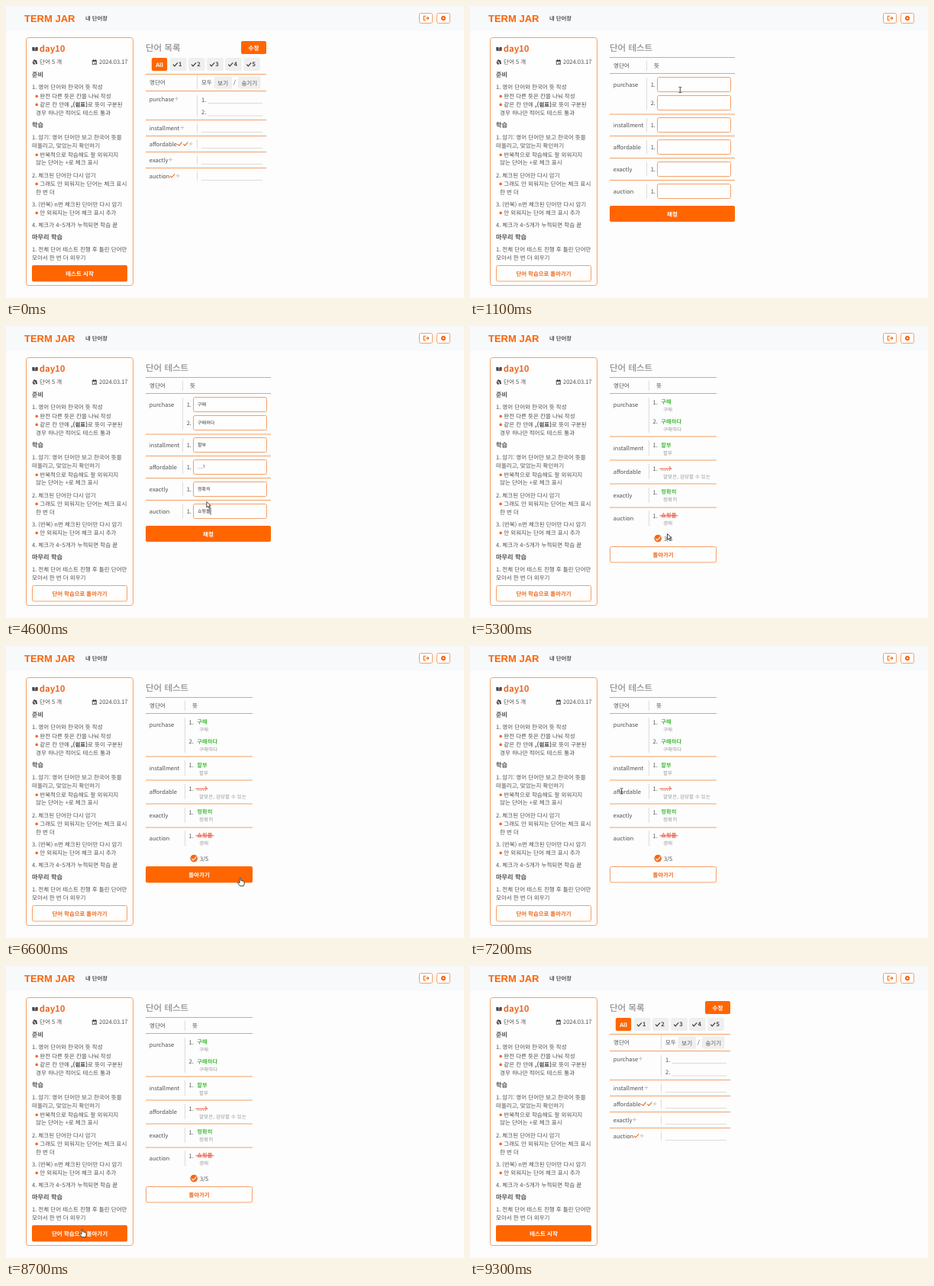
Recreate the animation shown at these times as an HTML page. Size 600 by 383 pixels, loop 9800 ms.

```html
<!DOCTYPE html>
<html lang="ko">
<head>
<meta charset="utf-8">
<title>단어 테스트</title>
<style>
  html, body { margin: 0; width: 100%; height: 100%; overflow: hidden; background: #fdfdfe; }
  svg { display: block; width: 600px; height: 383px; }
  text { font-family: "Noto Sans CJK KR", "Noto Sans KR", "Noto Sans CJK", sans-serif; font-size: 7.5px; fill: #505050; white-space: pre; text-rendering: geometricPrecision; }
  .bold { font-weight: 700; fill: #444; }
  .nav { font-size: 7.3px; font-weight: 700; fill: #555; }
  .title { font-size: 11.5px; font-weight: 300; fill: #777; }
  .head { font-size: 8.2px; font-weight: 700; fill: #555; }
  .day { font-size: 11.3px; font-weight: 700; fill: #ee6a1c; }
  .brand { font: 700 13px "Liberation Sans", Arial, sans-serif; fill: #f7640a; }
  .typed { font-size: 6.1px; fill: #333; }
  .sub { font-size: 6.6px; fill: #999; }
  .good { font-size: 7.3px; font-weight: 700; fill: #3fbf3a; }
  .bad { font-size: 7.3px; font-weight: 700; fill: #f2654f; }
  .strike { stroke: #f2553f; }
  .white { font-weight: 700; fill: #fff; }
  .plain { fill: #fff; }
  .orange { font-size: 7.4px; font-weight: 700; fill: #ee6a1c; }
  .mid { text-anchor: middle; }
  .rule { stroke: #f3a065; }
  .gray { stroke: #d4d4d4; stroke-width: .8; }
  .bar { fill: #f8f9fa; }
  .fill { fill: #ff6600; }
  .mark { fill: #ee6a1c; }
  .soft { fill: #efefef; }
  .box { fill: #fefefe; stroke: #f5a168; }
  .select { fill: #3767c8; }
  .icon { fill: #484848; fill-rule: evenodd; }
  .tick { fill: none; stroke: #ee6a1c; stroke-width: 1.1; }
  .dark { stroke: #333; }
  .light { stroke: #fff; }
  .plus { stroke: #bbb; stroke-width: .8; }
  .pointer { fill: #fff; stroke: #333; stroke-width: .9; stroke-linejoin: round; }
  .beam { fill: none; stroke: #333; stroke-width: .9; }
  #caret { stroke: #333; stroke-width: .8; }
</style>
</head>
<body>
<svg viewBox="0 0 600 383" id="stage"></svg>
<script>
const LOOP = 9800;

// Markup helpers: text is placed by its vertical centre.
const text = (x, y, s, cls = '') => {
  const drop = /title|day/.test(cls) ? 4.3 : /typed|sub/.test(cls) ? 2.3 : 2.8;
  return `<text x="${x}" y="${y + drop}" class="${cls}">${s}</text>`;
};
const rect = (x, y, w, h, cls, r = 2) =>
  `<rect x="${x}" y="${y}" width="${w}" height="${h}" rx="${r}" class="${cls}"/>`;
const dot = (x, y, r, cls) => `<circle cx="${x}" cy="${y}" r="${r}" class="${cls}"/>`;
const path = (d, cls) => `<path d="${d}" class="${cls}"/>`;
const line = (x1, y1, x2, y2, cls) => path(`M${x1} ${y1}L${x2} ${y2}`, cls);
const rules = (x2, ys) => ys.map(y => line(183, y, x2, y, 'rule')).join('');
const dividers = (x, spans) => spans.map(([a, b]) => line(x, a, x, b, 'gray')).join('');
const button = (x, y, w, h, label, cls, textCls = '') =>
  rect(x, y, w, h, cls) + text(x + w / 2, y + h / 2 + .2, label, 'mid ' + textCls);
const tick = (x, y, cls = '') => path(`M${x} ${y}l2 2.2l4 -4.6`, 'tick ' + cls);
const plus = (x, y) => path(`M${x} ${y}h5m-2.5 -2.5v5`, 'plus');
const group = (id, body) => `<g id="${id}">${body}</g>`;

const words = ['purchase', 'installment', 'affordable', 'exactly', 'auction'];
const wordColumn = ys => words.map((w, i) => text(187.8, ys[i], w)).join('');

function header() {
  const gear = [0, 45, 90, 135].map(a =>
    `<g transform="rotate(${a} 573 16)">${rect(572, 12.9, 2, 6.2, 'mark', 0)}</g>`).join('');
  return rect(0, 0, 600, 32, 'bar', 0) +
    '<text x="24" y="21" class="brand">TERM JAR</text>' +
    text(104, 16.2, '내 단어장', 'nav') +
    rect(541.5, 9.5, 17, 13, 'box') + rect(564.5, 9.5, 17, 13, 'box') +
    path('M550 13.3h-2.6v5.4h2.6M549.5 16h4M552 14.2l1.8 1.8l-1.8 1.8', 'tick') +
    gear + dot(573, 16, 2.3, 'mark') + dot(573, 16, 1, 'plain');
}

function sidebar() {
  const heads = [[90, '준비'], [156, '학습'], [303, '마무리 학습']];
  const indent = 44.3;
  const notes = [
    [34, 106, '1. 영어 단어와 한국어 뜻 작성'],
    [indent, 118, '완전 다른 뜻은 칸을 나눠 작성'],
    [indent, 129, '같은 칸 안에 <tspan class="bold">,(쉼표)</tspan>로 뜻이 구분된'],
    [39, 139.7, '경우 하나만 적어도 테스트 통과'],
    [34, 172, '1. 암기: 영어 단어만 보고 한국어 뜻을'],
    [34, 183, '떠올리고, 맞았는지 확인하기'],
    [indent, 194.8, '반복적으로 학습해도 잘 외워지지'],
    [39, 205.5, '않는 단어는 +로 체크 표시'],
    [34, 222, '2. 체크된 단어만 다시 암기'],
    [indent, 233, '그래도 안 외워지는 단어는 체크 표시'],
    [39, 243.7, '한 번 더'],
    [34, 260, '3. (반복) n번 체크된 단어만 다시 암기'],
    [indent, 271, '안 외워지는 단어 체크 표시 추가'],
    [34, 287, '4. 체크가 4~5개가 누적되면 학습 끝'],
    [34, 319.3, '1. 전체 단어 테스트 진행 후 틀린 단어만'],
    [34, 330, '모아서 한 번 더 외우기'],
  ];
  return rect(26.5, 41.5, 140, 325, 'box', 3) +
    path('M34.3 54q2 -.6 3.4 .5v4.8q-1.5 -1 -3.4 -.5zM41.7 54q-2 -.6 -3.4 .5v4.8q1.5 -1 3.4 -.5z', 'icon') +
    text(43.7, 56, 'day10', 'day') +
    path('M36.5 70.3l3.6 .9l1 4.6l-2 .7l-1 -3.6l-3 -.4zM34.2 73.2l3 .2l1 3.4l-2.4 -.3z', 'icon') +
    text(44, 73.6, '단어 5 개') +
    path('M112.8 71h6v6h-6zM113.6 73v3.2h4.4v-3.2zM114 70h1v1h-1zM116.8 70h1v1h-1zM115.8 74.2h1.6v1.6h-1.6z', 'icon') +
    text(122, 73.6, '2024.03.17') +
    heads.map(([y, s]) => text(34, y, s, 'head')).join('') +
    notes.map(([x, y, s]) => (x === indent ? dot(40.2, y + .4, 1.8, 'mark') : '') + text(x, y, s)).join('') +
    group('start', button(34, 340, 125, 21.5, '테스트 시작', 'fill', 'white')) +
    group('back', button(34.5, 340.5, 124, 20.5, '단어 학습으로 돌아가기', 'box', 'orange')) +
    group('backHover', button(34, 340, 125, 21.5, '단어 학습으로 돌아가기', 'fill', 'white'));
}

function listScreen() {
  const rows = [122.3, 160, 181, 202, 223];
  const tabs = [1, 2, 3, 4, 5].map(n => {
    const x = 190.8 + n * 24.1;
    return rect(x, 68, 21.6, 17, 'soft') + tick(x + 4, 76.7, 'dark') +
      text(x + 11.2, 76.5, n, 'bold');
  }).join('');
  return text(183, 55, '단어 목록', 'title') +
    button(308, 46, 33, 17, '수정', 'fill', 'white') +
    button(190.8, 68, 20.4, 17, 'All', 'fill', 'white') + tabs +
    rules(341, [89.5, 111.5, 149.5, 170.5, 191.5, 212.5]) +
    text(188, 100.5, '영단어') + text(256, 100.5, '모두') +
    button(272.5, 92.5, 23.5, 16, '보기', 'soft') + text(298, 100.5, '/') +
    button(304, 92.5, 29.5, 16, '숨기기', 'soft') +
    dividers(250.5, [[90, 110], [117, 145], ...rows.slice(1).map(y => [y - 6, y + 6])]) +
    wordColumn(rows) +
    plus(220.9, 121.5) + plus(228.5, 159.5) + plus(239.5, 180.8) + plus(213, 201.5) + plus(222.5, 222.7) +
    tick(224.6, 181) + tick(232.3, 181) + tick(215, 222.8) +
    text(256, 123, '1.') + text(256, 139.3, '2.') +
    line(264.5, 127.5, 336, 127.5, 'gray') + line(264.5, 144, 336, 144, 'gray') +
    rows.slice(1).map(y => line(256, y + 5.5, 336, y + 5.5, 'gray')).join('');
}

const inputYs = [103, 127, 156, 185, 214, 243];

function testScreen() {
  const rows = [103, 156, 185, 214, 243];
  return text(183, 55, '단어 테스트', 'title') +
    rules(347, [67.5, 88.5, 142, 170.5, 199.5, 228.5]) +
    text(188, 78, '영단어') + text(241, 78, '뜻') +
    dividers(231.5, [[72, 85], [94, 136], ...rows.slice(1).map(y => [y - 9, y + 9])]) +
    wordColumn(rows) +
    inputYs.map((y, i) => text(236.7, y + .3, i === 1 ? '2.' : '1.') +
      rect(245.5, y - 9.5, 96, 19, 'box') +
      group('in' + i, text(251, y, '', 'typed'))).join('') +
    '<path id="caret"/>' +
    button(183, 262, 164, 21, '채점', 'fill', 'white');
}

function resultScreen() {
  const rows = [103, 160, 191, 222, 252.5];
  const answers = [
    [99.5, '구매', '구매'], [125, '구매하다', '구매하다'], [156, '할부', '할부'],
    [187, '....?', '알맞은, 감당할 수 있는', 16], [217.5, '정확히', '정확히'], [248.5, '쇼핑몰', '경매', 24],
  ];
  const selected = (id, row, w) => group(id, rect(187.5, rows[row] - 5.5, w, 11, 'select', 0) +
    text(187.8, rows[row], words[row], 'plain'));
  return text(183, 55, '단어 테스트', 'title') +
    rules(323, [67.5, 88.5, 145, 176, 207, 238]) +
    text(188, 78, '영단어') + text(244, 78, '뜻') +
    dividers(234.5, [[72, 85], [94, 140], ...rows.slice(1).map(y => [y - 10, y + 10])]) +
    wordColumn(rows) +
    selected('pickA', 2, 36.5) + selected('pickB', 4, 26.7) +
    answers.map(([y, given, right, strike], i) =>
      text(239.5, y + .3, i === 1 ? '2.' : '1.') + text(250.3, y, given, strike ? 'bad' : 'good') +
      (strike ? path(`M248.5 ${y + .3}h${strike}`, 'strike') : '') +
      text(253, y + 10.5, right, 'sub')).join('') +
    dot(246.2, 278.6, 4.8, 'mark') + tick(243.4, 278.8, 'light') +
    text(254, 278.8, '3/5') +
    group('again', button(183.5, 289.5, 139, 20.5, '돌아가기', 'box', 'orange')) +
    group('againHover', button(183, 289, 140, 21.5, '돌아가기', 'fill', 'white'));
}

const pointers =
  group('arrow', path('M0 0v7.6l1.8 -1.6l1.3 2.8l1.2 -.6l-1.3 -2.6h2.5z', 'pointer')) +
  group('hand', path('M-1 -4.2q1 -1.2 1.8 0v3q1.2 -.5 1.6 .4q1.1 -.4 1.5 .5q1.3 -.2 1.3 1.2v2.2l-1 2.7h-4.6l-3 -4q-.3 -1.4 1.1 -1l1.3 1.2z', 'pointer')) +
  group('beam', path('M-1.8 -3.6h1.3l.5 .5l.5 -.5h1.3M0 -3v6M-1.8 3.6h1.3l.5 -.5l.5 .5h1.3', 'beam'));

const stage = document.getElementById('stage');
stage.innerHTML = header() + sidebar() + group('list', listScreen()) +
  group('test', testScreen()) + group('result', resultScreen()) + group('pointer', pointers);

const $ = id => document.getElementById(id);
const show = (id, on) => $(id).setAttribute('display', on ? 'inline' : 'none');

// Pointer stops: time, x, y, shape from then on.
const stops = [
  [100, 150, 290, 'arrow'], [400, 104, 351, 'hand'], [600, 104, 351, 'arrow'],
  [900, 275.3, 110, 'beam'], [4400, 275.3, 110, 'arrow'], [4700, 258.5, 272.5, 'hand'],
  [4800, 258.5, 272.5, 'arrow'], [6100, 258.5, 272.5, 'arrow'], [6500, 307, 309, 'hand'],
  [6800, 307, 309, 'arrow'], [7100, 189, 190, 'beam'], [7400, 226, 191, 'arrow'],
  [7600, 189, 252, 'beam'], [7900, 225.3, 249, 'arrow'], [8200, 225.3, 249, 'arrow'],
  [8600, 100, 350, 'hand'], [8900, 100, 350, 'arrow'], [9200, 102, 374, 'arrow'], [9300, 102, 383, 'arrow'],
];

// Each input: focus time, first key time, and the text after each 100 ms.
const typing = [
  [1000, 1500, '구|구매'],
  [1700, 1700, '구|구매|구매하|구매하다'],
  [2100, 2100, '하|할|할부'],
  [2400, 2600, '.|..|...|....|....?'],
  [3200, 3400, '저|정|정화|정확|정확히'],
  [3900, 4000, '쇼|쇼피|쇼핑|쇼핑모|쇼핑몰'],
].map(([focus, from, keys]) => ({ focus, from, keys: keys.split('|') }));

function drawPointer(t) {
  const i = stops.findLastIndex(s => s[0] <= t);
  const visible = i >= 0 && i < stops.length - 1;
  show('pointer', visible);
  if (!visible) return;
  const [t0, x0, y0, shape] = stops[i], [t1, x1, y1] = stops[i + 1];
  const p = (t - t0) / (t1 - t0), e = p * p * (3 - 2 * p);
  $('pointer').setAttribute('transform', `translate(${x0 + (x1 - x0) * e} ${y0 + (y1 - y0) * e})`);
  for (const s of ['arrow', 'hand', 'beam']) show(s, s === shape);
}

function drawTyping(t) {
  const fields = typing.map((_, i) => $('in' + i).firstChild);
  typing.forEach(({ from, keys }, i) => {
    const n = Math.min(Math.floor((t - from) / 100), keys.length - 1);
    fields[i].textContent = n < 0 ? '' : keys[n];
  });
  const active = typing.findLastIndex(f => f.focus <= t);
  show('caret', active >= 0 && !(t >= 1100 && t < 1300));
  if (active < 0) return;
  const x = 251.2 + fields[active].getComputedTextLength();
  $('caret').setAttribute('d', `M${x} ${inputYs[active] - 4.8}v9.6`);
}

function draw(time) {
  const t = Math.floor(time % LOOP / 100) * 100;
  const within = (a, b) => t >= a && t < b;
  const test = within(600, 4800), result = within(4800, 8900);
  const list = !test && !result;
  const backHover = within(8600, 8900), againHover = within(6500, 6800);
  show('list', list);
  show('test', test);
  show('result', result);
  show('start', list);
  show('back', !list && !backHover);
  show('backHover', backHover);
  show('again', !againHover);
  show('againHover', againHover);
  show('pickA', within(7400, 7600));
  show('pickB', within(7800, 8400));
  if (test) drawTyping(t);
  drawPointer(t);
}

const begun = performance.now();
function frame() {
  draw(performance.now() - begun);
  requestAnimationFrame(frame);
}
frame();
</script>
</body>
</html>
```
